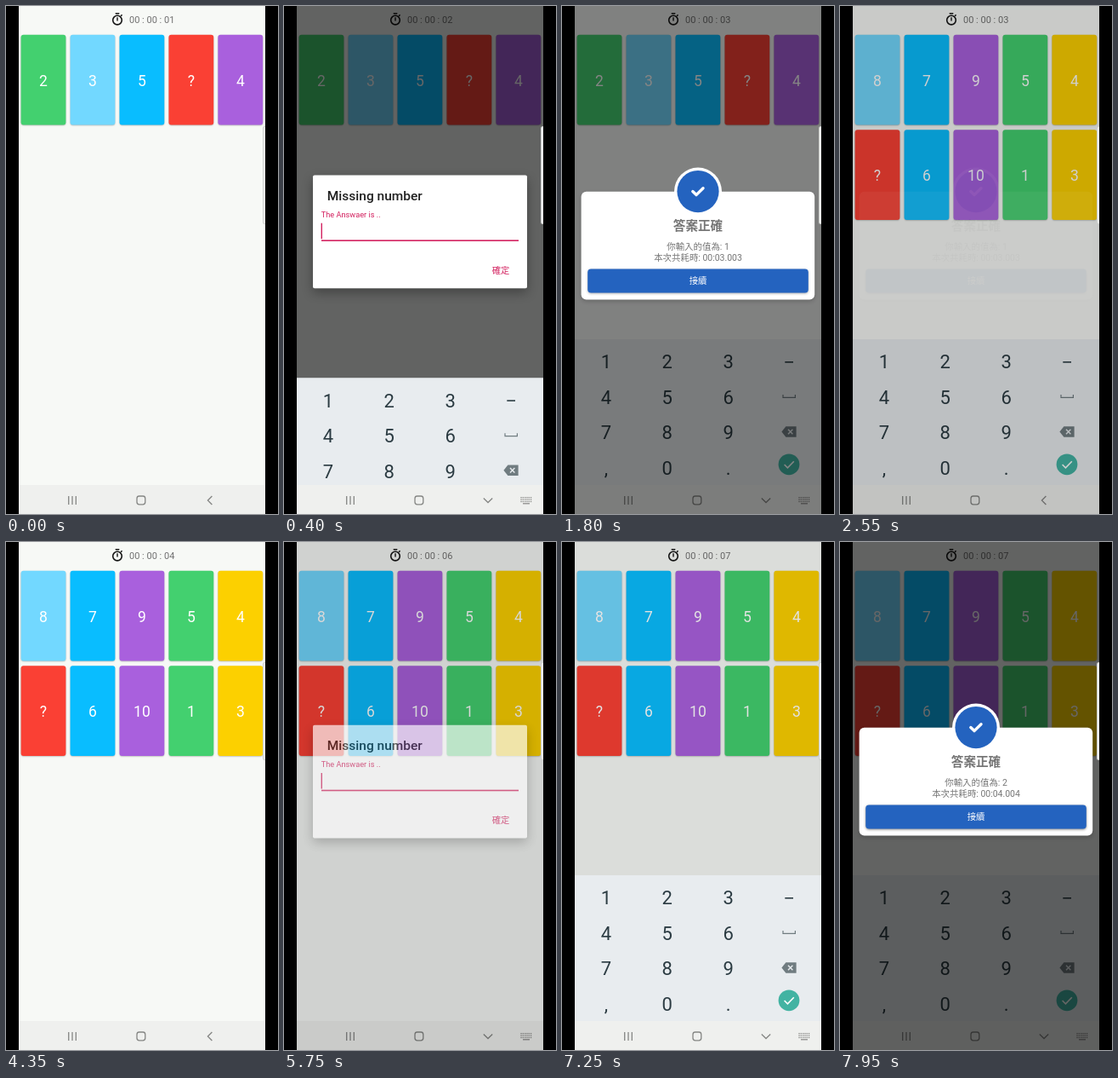
Write an HTML page with a canvas that moves like this. It is 320 px wide and 596 px high and loops after 8 s.

```html
<!DOCTYPE html>
<html lang="zh-Hant">
<head>
<meta charset="utf-8">
<title>Missing number</title>
<style>
  html, body { margin: 0; width: 100%; height: 100%; overflow: hidden; background: #000; }
  canvas { display: block; width: 320px; height: 596px; }
</style>
</head>
<body>
<canvas id="stage"></canvas>
<script>
const W = 320, H = 596, LOOP = 8000;
const LEFT = 15, RIGHT = 305, NAV_TOP = 562, KEYS_TOP = 391;
const ROBOTO = 'Roboto, "Noto Sans CJK TC", "Noto Sans CJK", sans-serif';
const CJK = '"Noto Sans CJK TC", "Noto Sans CJK", sans-serif';
const BG = '#f7f9f6', PINK = '#d3215f', BLUE = '#2463bf', DIM = 0.6;
const COLORS = {
  g: '#43d06f', l: '#72d8ff', b: '#09bdff', r: '#fa4034', p: '#a960dd', y: '#fcd000'
};
const BOARDS = [
  { faces: ['2', '3', '5', '?', '4'], tint: 'glbrp' },
  { faces: ['8', '7', '9', '5', '4', '?', '6', '10', '1', '3'], tint: 'lbpgyrbpgy' }
];
const ROUNDS = [
  { open: 50, type: 870, send: 1210, press: 2350, answer: '1', spent: '00:03.003' },
  { open: 5650, type: 6500, send: 6930, press: 7900, answer: '2', spent: '00:04.004' }
];
const BOARD_SWAP = 2450;
const TICKS = [400, 1400, 3450, 4450, 5450, 6450];

const dpr = window.devicePixelRatio || 1;
function setup(canvas) {
  canvas.width = W * dpr;
  canvas.height = H * dpr;
  const c = canvas.getContext('2d');
  c.scale(dpr, dpr);
  return c;
}
const main = setup(document.getElementById('stage'));
const layer = setup(document.createElement('canvas'));
let ctx = main;

const ramp = (t, start, len) => Math.min(1, Math.max(0, (t - start) / len));
const smooth = p => p * p * (3 - 2 * p);
const easeOut = p => 1 - (1 - p) ** 3;

function rect(x, y, w, h, r, fill) {
  ctx.beginPath();
  ctx.roundRect(x, y, w, h, r);
  ctx.fillStyle = fill;
  ctx.fill();
}

function disc(x, y, r, fill) {
  ctx.beginPath();
  ctx.arc(x, y, r, 0, Math.PI * 2);
  ctx.fillStyle = fill;
  ctx.fill();
}

function line(points, color, width, cap = 'butt') {
  ctx.beginPath();
  points.forEach(([x, y]) => ctx.lineTo(x, y));
  ctx.strokeStyle = color;
  ctx.lineWidth = width;
  ctx.lineCap = cap;
  ctx.lineJoin = cap === 'round' ? 'round' : 'miter';
  ctx.stroke();
}

function text(str, x, y, size, color, { align = 'left', weight = 400, font = ROBOTO } = {}) {
  ctx.font = `${weight} ${size}px ${font}`;
  ctx.textAlign = align;
  ctx.textBaseline = 'alphabetic';
  ctx.fillStyle = color;
  ctx.fillText(str, x, y);
}

function shadow(alpha, blur, dy) {
  ctx.shadowColor = `rgba(0,0,0,${alpha})`;
  ctx.shadowBlur = blur * dpr;
  ctx.shadowOffsetY = dy * dpr;
}
const noShadow = () => { ctx.shadowColor = 'transparent'; };

// Draws a whole group on a separate layer, then blends it once.
function fade(alpha, draw) {
  if (alpha <= 0) return;
  layer.clearRect(0, 0, W, H);
  ctx = layer;
  draw();
  ctx = main;
  ctx.globalAlpha = alpha;
  ctx.drawImage(layer.canvas, 0, 0, W, H);
  ctx.globalAlpha = 1;
}

function dim(alpha) {
  ctx.fillStyle = `rgba(0,0,0,${alpha})`;
  ctx.fillRect(LEFT, 0, RIGHT - LEFT, H);
}

function drawClock(t) {
  const n = 1 + TICKS.filter(k => t >= k).length;
  ctx.beginPath();
  ctx.arc(131, 16.6, 5.3, 0, Math.PI * 2);
  ctx.strokeStyle = '#151515';
  ctx.lineWidth = 1.6;
  ctx.stroke();
  line([[128.7, 8.8], [133.3, 8.8]], '#151515', 1.5);
  line([[131, 13.3], [131, 17.4]], '#151515', 1.4);
  line([[135, 11.8], [136.6, 10.4]], '#151515', 1.5);
  text(`00 : 00 : 0${n}`, 145, 20, 11, '#707070');
}

function drawBoard({ faces, tint }) {
  faces.forEach((face, i) => {
    const x = 17.6 + (i % 5) * 57.95, y = 33.8 + Math.floor(i / 5) * 111.4;
    shadow(0.25, 1.5, 0.7);
    rect(x, y, 52.8, 105.8, 3, COLORS[tint[i]]);
    noShadow();
    text(face, x + 26.4, y + 59.8, 17.5, '#fff', { align: 'center' });
  });
}

function drawNav(typing) {
  const grey = '#858684';
  ctx.fillStyle = '#eff0ee';
  ctx.fillRect(LEFT, NAV_TOP, RIGHT - LEFT, H - NAV_TOP);
  for (const x of [73.7, 78, 82.3]) line([[x, 575], [x, 585]], grey, 1.3);
  ctx.beginPath();
  ctx.roundRect(154, 575, 9.8, 9.8, 2.8);
  ctx.lineWidth = 1.3;
  ctx.strokeStyle = grey;
  ctx.stroke();
  if (!typing) {
    line([[242.4, 575], [237.4, 580], [242.4, 585]], grey, 1.3);
    return;
  }
  line([[234.8, 577.5], [240, 582.5], [245.2, 577.5]], grey, 1.3);
  ctx.fillStyle = grey;
  for (let r = 0; r < 3; r++)
    for (let c = 0; c < 6; c++) ctx.fillRect(278.4 + c * 2.3, 576 + r * 2.4, 1.3, 1.3);
  ctx.fillRect(281, 583.2, 8, 1.2);
}

function drawKeys(up) {
  ctx.save();
  ctx.beginPath();
  ctx.rect(LEFT, 0, RIGHT - LEFT, NAV_TOP);
  ctx.clip();
  ctx.translate(0, (1 - up) * (NAV_TOP - KEYS_TOP));
  ctx.fillStyle = '#e8ecef';
  ctx.fillRect(LEFT, KEYS_TOP, RIGHT - LEFT, NAV_TOP - KEYS_TOP);
  const ink = '#2b3b42', grey = '#707c80';
  [...'123456789,0.'].forEach((key, i) => {
    const x = 52 + (i % 3) * 71.8, y = 425.4 + Math.floor(i / 3) * 41.5;
    text(key, x, y, 22, ink, { align: 'center' });
  });
  line([[262.3, 417.8], [272, 417.8]], ink, 1.6);
  line([[260, 456], [260, 459.4], [274.4, 459.4], [274.4, 456]], grey, 1.2);
  ctx.beginPath();
  [[258.4, 499.5], [263.4, 493.2], [275.6, 493.2], [275.6, 505.8], [263.4, 505.8]]
    .forEach(([x, y]) => ctx.lineTo(x, y));
  ctx.fillStyle = grey;
  ctx.fill();
  line([[266, 496.8], [271.4, 502.2]], '#e8ecef', 1.4);
  line([[271.4, 496.8], [266, 502.2]], '#e8ecef', 1.4);
  disc(267, 537.8, 12.4, '#42b3a2');
  line([[261.6, 538], [265.4, 541.8], [272.8, 534.2]], '#fff', 1.6);
  ctx.restore();
}

function drawQuestion(t, round, shift) {
  ctx.save();
  ctx.translate(0, shift);
  shadow(0.32, 13, 5);
  rect(34, 129.2, 252, 132.8, 2, '#fff');
  noShadow();
  text('Missing number', 50.8, 158.6, 15.5, '#212121', { weight: 500 });
  text('The Answaer is ..', 43.8, 178.6, 9.2, PINK);
  const typed = t >= round.type;
  if (typed) text(round.answer, 43.6, 200.4, 15, '#212121');
  ctx.fillStyle = PINK;
  ctx.fillRect(44, 205.2, 232, 1.6);
  ctx.fillRect(typed ? 51.3 : 43.6, 185.5, 1.4, 18.5);
  if (t >= round.send) {
    const p = ramp(t, round.send, 240);
    disc(263 - 5 * p, 239.5 + 3.5 * p, 11.5 + 4.5 * p, `rgba(0,0,0,${0.03 + 0.07 * p})`);
  }
  text('確定', 255, 244.6, 10.3, PINK, { align: 'center', weight: 500, font: CJK });
  ctx.restore();
}

function drawResult(t, round) {
  shadow(0.2, 5, 2);
  rect(22.6, 217.8, 274.6, 126.6, 6, '#fff');
  noShadow();
  disc(160, 217.6, 28, '#fff');
  disc(160, 217.6, 24.6, BLUE);
  line([[153.8, 217.6], [158, 221.6], [166, 213.8]], '#fff', 3.4, 'round');
  const mid = { align: 'center' };
  text('答案正確', 160, 262.6, 14.6, '#757575', { ...mid, weight: 700, font: CJK });
  text(`你輸入的值為: ${round.answer}`, 160, 285.8, 10.45, '#757575', mid);
  text(`本次共耗時: ${round.spent}`, 160, 298.6, 10.45, '#757575', mid);
  shadow(t >= round.press ? 0.45 : 0.3, 3, 1);
  rect(30.2, 308.6, 259.6, 28, 4, BLUE);
  noShadow();
  text('接續', 160, 326.4, 10.3, '#fff', { ...mid, weight: 500, font: CJK });
}

function drawEdge() {
  rect(302, 141, 6, 115, 2.5, '#cfd1ce');
  rect(303, 141.8, 6, 113.4, 2, '#f6f8f6');
}

function draw(t) {
  const round = t < ROUNDS[1].open ? ROUNDS[0] : ROUNDS[1];
  const { open, send, press } = round;
  const leave = send + 140, show = send + 390, close = press + 70;

  const up = easeOut(ramp(t, open + 240, 310)) * (1 - smooth(ramp(t, close + 150, 230)));
  const askDim = DIM * smooth(ramp(t, open, 300)) * (1 - smooth(ramp(t, leave, 250)));
  const askAlpha = ramp(t, open - 5, 160) * (1 - ramp(t, leave, 150));
  const lift = smooth(ramp(t, open + 270, 290));
  const doneDim = DIM * smooth(ramp(t, show, 280)) * (1 - smooth(ramp(t, close - 20, 240)));
  const doneAlpha = ramp(t, show, 200) * (1 - ramp(t, close, 137));
  const typing = t >= open && t < close + 30;

  ctx.fillStyle = '#000';
  ctx.fillRect(0, 0, W, H);
  ctx.save();
  ctx.beginPath();
  ctx.rect(LEFT, 0, RIGHT - LEFT, H);
  ctx.clip();
  ctx.fillStyle = BG;
  ctx.fillRect(LEFT, 0, RIGHT - LEFT, H);
  drawClock(t);
  drawBoard(BOARDS[t < BOARD_SWAP ? 0 : 1]);
  drawNav(typing);
  dim(askDim);
  fade(askAlpha, () => drawQuestion(t, round, 85.5 * (1 - lift)));
  if (up > 0) {
    drawKeys(up);
    drawNav(typing);
  }
  dim(doneDim);
  fade(doneAlpha, () => drawResult(t, round));
  drawEdge();
  ctx.restore();
}

const began = performance.now();
function frame() {
  draw((performance.now() - began) % LOOP);
  requestAnimationFrame(frame);
}
frame();
</script>
</body>
</html>
```
